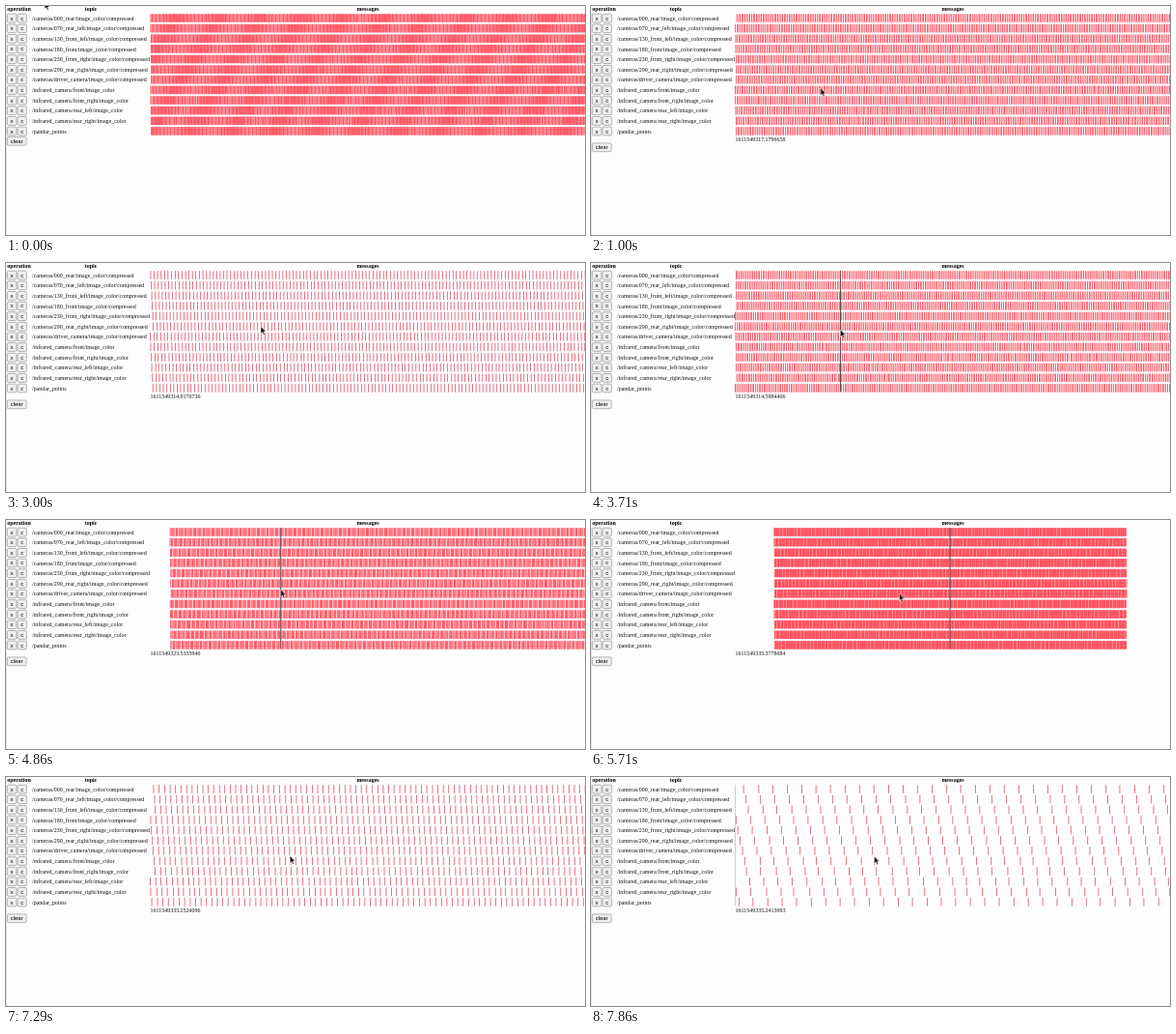
An HTML page with a canvas for the animation above (8000 ms loop, 600 by 237 pixels).

```html
<!DOCTYPE html>
<html lang="en">
<head>
<meta charset="utf-8">
<title>Message timeline</title>
<style>
  html, body { margin: 0; width: 100%; height: 100%; overflow: hidden; background: #fefdfe; }
  canvas, svg { position: absolute; left: 0; top: 0; width: 600px; height: 237px; }
  text { font: 5.97px "Liberation Serif", serif; fill: #111; }
  .head { font-weight: bold; text-anchor: middle; fill: #000; }
  .button rect { fill: #efeff0; stroke: #858589; stroke-width: .6; }
  .button text { font: 6px "Liberation Sans", sans-serif; text-anchor: middle; fill: #000; }
</style>
</head>
<body>
<canvas width="600" height="237"></canvas>
<svg viewBox="0 0 600 237">
  <path d="M.5 8V237" stroke="#e9e7ec"/>
  <text class="head" x="13.5" y="5.4">operation</text>
  <text class="head" x="88" y="5.4">topic</text>
  <text class="head" x="375" y="5.4">messages</text>
  <g id="rows"></g>
  <text id="stamp" x="149.5" y="140.2"></text>
  <g id="clear"></g>
  <path id="marker" d="M0 8V133.2"/>
  <path id="cursor" d="M0 0V7.6L1.7 6.1L2.9 8.8L4.2 8.2L3 5.6H5.3Z" fill="#111" stroke="#fff" stroke-width=".5"/>
</svg>
<script>
const LOOP = 8000, FPS = 7;
const LEFT = 149.5, RIGHT = 600, TOP = 8.2, PITCH = 10.63, BAR = 8.6;
const COUNT = 440, FIT = (RIGHT - LEFT) / COUNT;
const PIXEL = .373; // the page is drawn at this scale; lines snap to its pixels

const topics = [
  ...["000_rear", "070_rear_left", "130_front_left", "180_front", "230_front_right", "290_rear_right", "driver_camera"]
    .map(name => `/cameras/${name}/image_color/compressed`),
  ...["front", "front_right", "rear_left", "rear_right"]
    .map(name => `/infrared_camera/${name}/image_color`),
  "/pandar_points"
];

// Each pose is reached at `end` after moving for `move` ms, then held.
const poses = [
  { end: 0, move: 0, x: 40, y: -4.5, spacing: FIT, start: LEFT, stamp: 17.5213694 },
  { end: 430, move: 430, x: 238, y: 85, stamp: 17.1796658 },
  { end: 1430, move: 720, spacing: 3.6, start: -73 },
  { end: 3000, move: 1290, x: 264, y: 65.5, start: 20, stamp: 14.9176736 },
  { end: 3710, move: 710, x: 258.5, y: 69, spacing: 1.75, start: 148, stamp: 14.5984406 },
  { end: 5430, move: 1000, x: 319.5, y: 76, spacing: .83, start: 189.5, stamp: 35.3778684 },
  { end: 6710, move: 1000, x: 295, y: 81, spacing: 2.1, start: 28, stamp: 35.263613 },
  { end: 7860, move: 1150, x: 293.5, y: 82, spacing: 15, start: -1612, stamp: 35.2413993 }
];
poses.forEach((pose, i) => { poses[i] = { ...poses[i - 1], ...pose }; });

const $ = id => document.getElementById(id);
const ctx = document.querySelector("canvas").getContext("2d");
const mix = (a, b, k) => a + (b - a) * k;
const hash = n => { const v = Math.sin(n * 12.9898) * 43758.5453; return v - Math.floor(v); };

// Zooms exponentially about a fixed pivot; everything else moves linearly.
function poseAt(t) {
  const i = Math.max(1, poses.findIndex(p => p.end >= t));
  const a = poses[i - 1], b = poses[i];
  const k = Math.max(0, 1 - (b.end - t) / b.move);
  const spacing = a.spacing * (b.spacing / a.spacing) ** k;
  const zoomed = a.spacing === b.spacing ? k : (spacing - a.spacing) / (b.spacing - a.spacing);
  return {
    spacing,
    start: mix(a.start, b.start, zoomed),
    x: mix(a.x, b.x, k),
    y: mix(a.y, b.y, k),
    stamp: mix(a.stamp, b.stamp, k)
  };
}

const button = (x, y, w, label) => `<g class="button">
  <rect x="${x}" y="${y}" width="${w}" height="8.8" rx="1.3"/>
  <text x="${x + w / 2}" y="${y + 6.4}">${label}</text></g>`;

$("rows").innerHTML = topics.map((topic, i) => {
  const y = TOP + i * PITCH;
  return button(1.3, y, 9.6, "x") + button(12, y, 9.4, "c") +
    `<text x="27" y="${y + 6.5}">${topic}</text>`;
}).join("");
$("clear").innerHTML = button(1.3, 135.4, 19.8, "clear");

const tracks = topics.map((topic, row) => {
  const jitter = topic.includes("infrared") ? .15 : .04;
  return Array.from({ length: COUNT }, (_, i) =>
    i + row * .15 % 1 + (hash(row * 997 + i) - .5) * jitter);
});

function drawTracks({ spacing, start }) {
  ctx.clearRect(0, 0, 600, 237);
  ctx.fillStyle = spacing > 3 ? "#d9475a" : "#ff2637";
  tracks.forEach((track, row) => {
    for (const message of track) {
      const x = Math.round((start + message * spacing) / PIXEL) * PIXEL;
      if (x >= LEFT - PIXEL && x < RIGHT) ctx.fillRect(x, TOP + row * PITCH, 2 * PIXEL, BAR);
    }
  });
}

// The line marks the middle of the overview, the pointer, or the left edge close up.
function drawMarker({ spacing, start, x }, active) {
  const close = spacing > 8;
  const lineX = close ? LEFT : spacing < 1 ? start + COUNT * spacing / 2 : x;
  $("marker").setAttribute("transform", `translate(${lineX} 0)`);
  $("marker").setAttribute("stroke", close ? "#bcd9c8" : active && spacing < 1.9 ? "#555" : "none");
}

function draw(t) {
  const pose = poseAt(t), hovered = t >= 140;
  drawTracks(pose);
  drawMarker(pose, t > 1430);
  $("cursor").setAttribute("transform", `translate(${pose.x} ${pose.y})`);
  $("stamp").textContent = hovered ? "16115493" + Number(pose.stamp.toFixed(7)) : "";
  $("clear").setAttribute("transform", `translate(0 ${hovered ? 6.5 : 0})`);
}

let shown = -1;
function tick() {
  const steps = LOOP * FPS / 1000;
  const step = Math.floor((performance.now() % LOOP + 5) * FPS / 1000) % steps;
  if (step !== shown) draw(Math.round(step * 100 / FPS) * 10);
  shown = step;
  requestAnimationFrame(tick);
}
tick();
</script>
</body>
</html>
```
